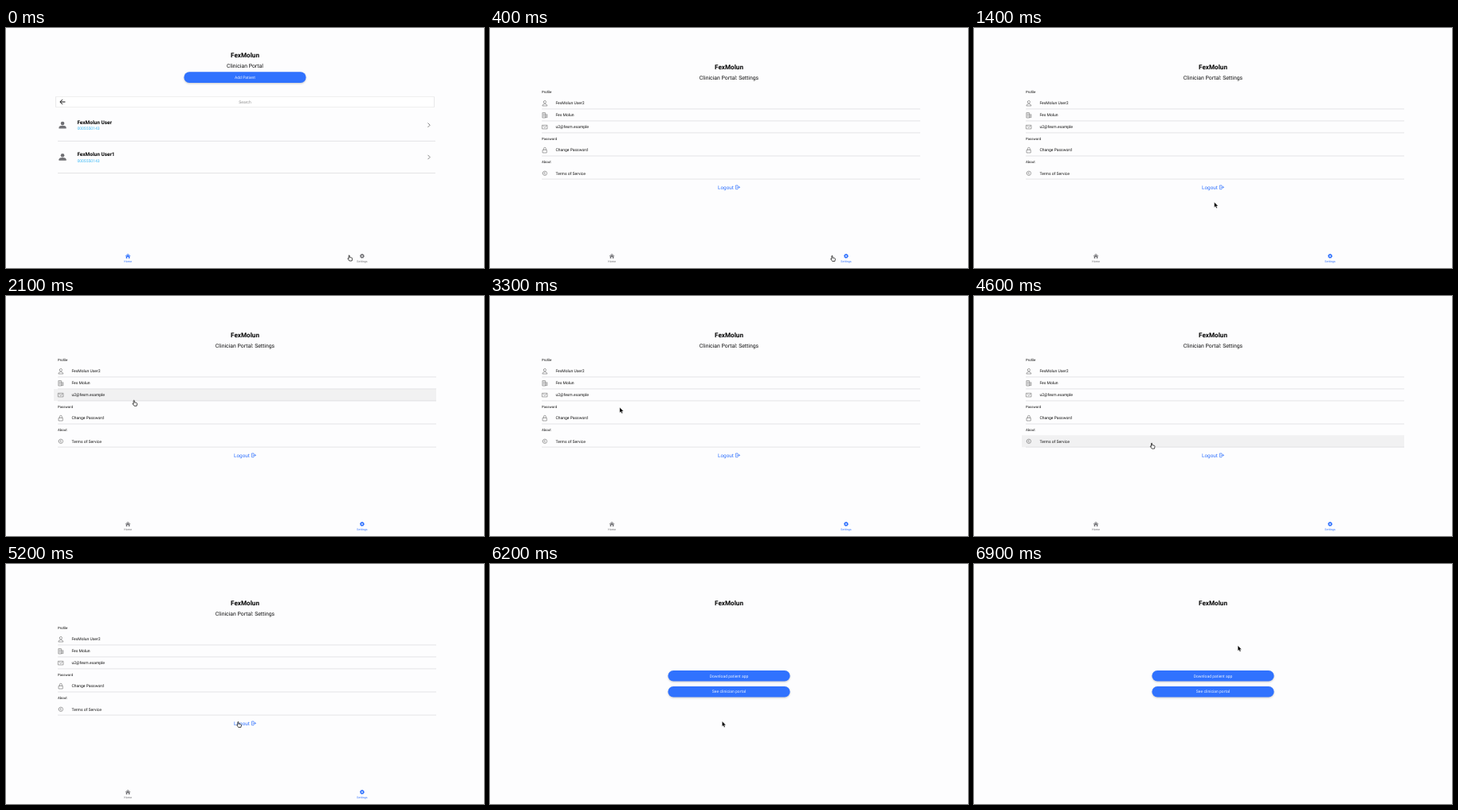
An HTML page that plays this animation: 600x302 px, repeating every 7000 ms.

```html
<!DOCTYPE html>
<html lang="en">
<head>
<meta charset="utf-8">
<title>Clinician Portal</title>
<style>
  html, body { margin: 0; width: 100%; height: 100%; overflow: hidden; background: #fdfdfe; }
  svg { display: block; width: 100vw; height: 100vh; }
  text { font: 5.03px Roboto, sans-serif; text-rendering: geometricPrecision; fill: #111; }
  .mid { text-anchor: middle; }
  .title { font-size: 8.15px; font-weight: 600; fill: #000; }
  .sub { font-size: 6.85px; }
  .name { font-size: 6.45px; font-weight: 600; fill: #000; }
  .phone { fill: #3db9f5; }
  .head { font-size: 4.35px; }
  .btn rect { fill: #3072fe; filter: drop-shadow(0 1px 1.3px #0003); }
  .btn text { fill: #e8f0ff; }
  .bar { fill: #fff; filter: drop-shadow(0 .7px .7px #0005); }
  .sep { stroke: #d9d9db; stroke-width: .7; }
  .line { fill: none; stroke: #777; stroke-width: .65; stroke-linejoin: round; stroke-linecap: round; }
  .solid { fill: #717175; }
  .tab { color: #717175; fill: currentColor; }
  .tab text { font-size: 3.65px; fill: currentColor; }
  .tab.on { color: #3072fe; }
</style>
</head>
<body>
<svg viewBox="0 0 600 302" preserveAspectRatio="none">
  <defs>
    <g id="person">
      <circle cy="-2" r="2.3"/>
      <path d="M-4.6 4.4V3Q-4 .7 0 .7T4.6 3V4.4Z"/>
    </g>
    <path id="chevron" d="M-1.2-2.4L1.2 0L-1.2 2.4"/>
  </defs>
  <rect id="hover" x="60" width="480" height="15" fill="#f1f1f2"/>

  <g id="home">
    <text class="mid title" x="300" y="37">FexMolun</text>
    <text class="mid sub" x="300" y="50.4">Clinician Portal</text>
    <g class="btn"><rect x="223.4" y="55.3" width="153.2" height="13.6" rx="6.8"/><text class="mid" x="300" y="63.8">Add Patient</text></g>
    <rect class="bar" x="62.5" y="86.3" width="475" height="13.4" rx=".6"/>
    <path d="M74.4 93H68M70.9 89.9L67.8 93L70.9 96.1" fill="none" stroke="#111" stroke-width="1"/>
    <text class="mid" x="300" y="94.9" style="fill:#909090">Search</text>
    <g id="patients"></g>
  </g>

  <g id="settings">
    <text class="mid title" x="300" y="52">FexMolun</text>
    <text class="mid sub" x="300" y="65.4">Clinician Portal: Settings</text>
    <text class="head" x="65" y="81.6">Profile</text>
    <text class="head" x="65" y="140.7">Password</text>
    <text class="head" x="65" y="169.8">About</text>
    <g id="items"></g>
    <text x="286" y="203.2" style="font-size:6.4px;fill:#3072fe">Logout</text>
    <path class="line" style="stroke:#3072fe" d="M311 199.2V198H308.4V202.8H311V201.6M310 200.4H313.3M312.2 199.2L313.4 200.4L312.2 201.6"/>
  </g>

  <g id="landing">
    <text class="mid title" x="300" y="52">FexMolun</text>
    <g class="btn"><rect x="223.4" y="134" width="153.2" height="13.6" rx="6.8"/><text class="mid" x="300" y="142.5">Download patient app</text></g>
    <g class="btn"><rect x="223.4" y="153.9" width="153.2" height="13.6" rx="6.8"/><text class="mid" x="300" y="162.4">See clinician portal</text></g>
  </g>

  <g id="tabs">
    <g id="homeTab" class="tab" transform="translate(153 287)">
      <path d="M-3.3 0L0-3.1L3.3 0L2.9.5L0-2.2L-2.9.5ZM-2.3.4L0-1.7L2.3.4V3H.8V1H-.8V3H-2.3Z"/>
      <text class="mid" y="8.2">Home</text>
    </g>
    <g id="settingsTab" class="tab" transform="translate(447 287)">
      <circle r="2.4"/>
      <circle r="2.5" fill="none" stroke="currentColor" stroke-width="1" stroke-dasharray=".98"/>
      <circle r=".9" fill="#fdfdfe"/>
      <text class="mid" y="8.2">Settings</text>
    </g>
  </g>

  <g id="cursor">
    <path id="hand" transform="translate(-2.2 0)" fill="#fff" stroke="#111" stroke-width=".75" stroke-linejoin="round"
      d="M1.7.8q.6-.7 1.1 0v2.2l2.6.6q.9.3.8 1.2l-.5 2.7h-3.2l-1.9-2.6q-.2-.8.6-.6l.5.5z"/>
    <path id="arrow" fill="#000" stroke="#fff" stroke-width=".3" d="M0 0v6.5l1.5-1.4 1 2.4 1.2-.5-1-2.3h2z"/>
  </g>
</svg>
<script>
const $ = id => document.getElementById(id);
const show = (id, on) => $(id).style.display = on ? '' : 'none';
const sep = (y, end) => `<path class="sep" d="M65 ${y}H${end}"/>`;

$('patients').innerHTML = ['FexMolun User', 'FexMolun User1'].map((name, i) => `
  <g transform="translate(0 ${i * 40.3})">
    <use href="#person" class="solid" x="71" y="122"/>
    <text class="name" x="89.4" y="120.9">${name}</text>
    <text class="phone" x="89.4" y="128.3">0005550143</text>
    <use href="#chevron" class="line" style="stroke-width:.9" x="531" y="122.2"/>
    ${sep(142.3, 539)}
  </g>`).join('');

// Row top, label, icon drawn around its centre
const rows = [
  [87.1, 'FexMolun User2', 'M-1.6-1.5A1.6 1.7 0 1 1 1.6-1.5A1.6 1.7 0 1 1-1.6-1.5M-3 3Q-2.8.9 0 .9T3 3Z'],
  [102.1, 'Fex Molun', 'M-3 3V-3H.6V3ZM.6-.8H3V3H.6M-1.8-1.5H-.6M-1.8 0H-.6M-1.8 1.5H-.6M1.8.6V1.6'],
  [117.1, 'u2@fexm.example', 'M-3.1-2.3H3.1V2.3H-3.1ZM-2-1.1L0 .5L2-1.1'],
  [146.2, 'Change Password', 'M-2.4-.4H2.4V3.3H-2.4ZM-1.4-.4V-2A1.4 1.4 0 0 1 1.4-2V-.4'],
  [175.3, 'Terms of Service', 'M-2.7 0A2.7 2.7 0 1 1 2.7 0A2.7 2.7 0 1 1-2.7 0M-.5-.3H.1V1.4M0-1.4V-1.3']
];
$('items').innerHTML = rows.map(([y, label, icon]) => `
  <path class="line" transform="translate(68.8 ${y + 7.5})" d="${icon}"/>
  <text x="82.4" y="${y + 9.2}">${label}</text>${sep(y + 14.8, 540)}`).join('');

// Pointer tip: time, x, y, and 1 to slow down on arrival
const path = [
  [0, 430.7, 285.5], [100, 429.4, 286], [800, 429.4, 286], [1000, 408.5, 287],
  [1200, 408.5, 287], [2000, 164.2, 132, 1], [2100, 160.6, 130.8], [3200, 160.6, 130.8],
  [3600, 165.7, 152.5, 1], [3900, 165.7, 152.5], [4000, 156.3, 159], [4200, 143, 167],
  [4700, 243, 189], [5200, 291.4, 198, 1], [6600, 291.4, 198], [6900, 331.2, 102.8]
];

function pointer(t) {
  const i = path.findIndex(k => k[0] >= t);
  if (i < 1) return path[0].slice(1, 3);
  const [t0, x0, y0] = path[i - 1], [t1, x1, y1, ease] = path[i];
  let p = (t - t0) / (t1 - t0);
  if (ease) p *= 2 - p;
  return [x0 + (x1 - x0) * p, y0 + (y1 - y0) * p];
}

function draw(now) {
  const t = Math.floor(now % 7000 / 100) * 100;
  const page = t < 300 ? 'home' : t < 6200 ? 'settings' : 'landing';
  for (const id of ['home', 'settings', 'landing']) show(id, id === page);
  show('tabs', page !== 'landing');
  $('homeTab').classList.toggle('on', page === 'home');
  $('settingsTab').classList.toggle('on', page === 'settings');

  const [x, y] = pointer(t);
  const row = page === 'settings' && rows.find(([top]) => y >= top && y < top + 15);
  const logout = x > 284 && y > 195 && y < 207;
  const hand = page !== 'landing' && (row || logout || y > 282);
  show('hover', row);
  if (row) $('hover').setAttribute('y', row[0]);
  show('hand', hand);
  show('arrow', !hand);
  $('cursor').setAttribute('transform', `translate(${x} ${y})`);
}

const start = performance.now();
function tick() {
  draw(performance.now() - start);
  requestAnimationFrame(tick);
}
tick();
</script>
</body>
</html>
```
